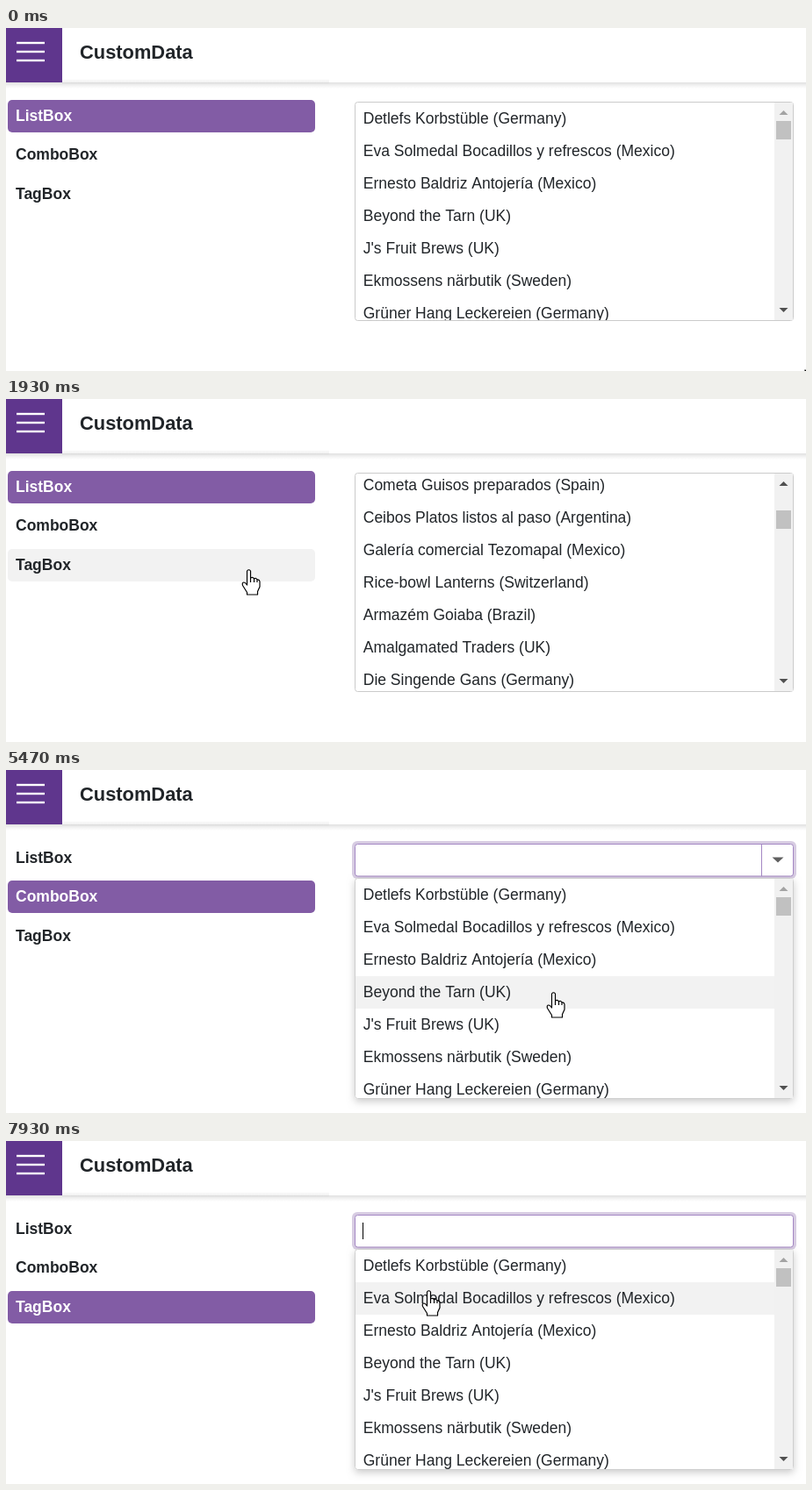
Write an HTML page with a canvas that moves like this. It is 911 by 391 pixels and loops after 8000 ms.

```html
<!DOCTYPE html>
<html lang="en">
<head>
<meta charset="utf-8">
<title>CustomData</title>
<style>
  html, body { margin: 0; width: 100%; height: 100%; overflow: hidden; background: #fff; }
  canvas { display: block; }
</style>
</head>
<body>
<canvas id="stage" width="911" height="391"></canvas>
<script>
const ctx = document.getElementById('stage').getContext('2d', { alpha: false });
const FONT = '"Liberation Sans", Arial, sans-serif';
const DURATION = 8000, TICKS = 120, ROW = 37;
const INK = '#212529', PURPLE = '#5f368d', ACTIVE = '#825ca5', HOVER = '#f2f2f2';

const companies = [
  'Detlefs Korbstüble (Germany)',
  'Eva Solmedal Bocadillos y refrescos (Mexico)',
  'Ernesto Baldriz Antojería (Mexico)',
  'Beyond the Tarn (UK)',
  "J's Fruit Brews (UK)",
  'Ekmossens närbutik (Sweden)',
  'Grüner Hang Leckereien (Germany)',
  'Marvoisant mère et fille (France)',
  'Vite doré (France)',
  'Copper-Nickel Grocers (Canada)',
  'Cometa Guisos preparados (Spain)',
  'Ceibos Platos listos al paso (Argentina)',
  'Galería comercial Tezomapal (Mexico)',
  'Rice-bowl Lanterns (Switzerland)',
  'Armazém Goiaba (Brazil)',
  'Amalgamated Traders (UK)',
  'Die Singende Gans (Germany)'
];
const menu = [
  { label: 'ListBox', y: 82 },
  { label: 'ComboBox', y: 126 },
  { label: 'TagBox', y: 171 }
];

// Keys are [tick, ...values]; there are 15 ticks per second.
const pointerKeys = [
  [0, 910, 390], [9, 640, 190], [24, 640, 190], [29, 277, 195], [33, 140, 160],
  [36, 115, 146], [46, 115, 146], [53, 482, 91], [54, 482, 91], [56, 505, 107],
  [71, 505, 107], [74, 640, 100], [77, 824, 160], [80, 700, 230], [84, 548, 278],
  [94, 82, 194], [104, 82, 194], [113, 482, 104], [117, 482, 104], [119, 482, 171]
];
const scrollKeys = [[0, 0], [12, 0], [15, 128], [18, 250], [20, 250], [24, 375]];

function valuesAt(keys, tick) {
  const next = keys.findIndex(key => key[0] > tick);
  if (next < 0) return keys[keys.length - 1].slice(1);
  const a = keys[next - 1], b = keys[next];
  const p = (tick - a[0]) / (b[0] - a[0]);
  return a.slice(1).map((v, i) => v + (b[i + 1] - v) * p);
}
const scrollAt = tick => Math.round(valuesAt(scrollKeys, tick)[0]);
const inside = (p, x, y, w, h) => p.x >= x && p.x < x + w && p.y >= y && p.y < y + h;

function rect(x, y, w, h, color) {
  ctx.fillStyle = color;
  ctx.fillRect(x, y, w, h);
}
function rounded(x, y, w, h, r, fill, stroke) {
  ctx.beginPath();
  ctx.roundRect(x, y, w, h, r);
  if (fill) { ctx.fillStyle = fill; ctx.fill(); }
  if (stroke) { ctx.strokeStyle = stroke; ctx.lineWidth = 1; ctx.stroke(); }
}
function text(str, x, y, color = INK, size = 17.5, weight = '') {
  ctx.font = `${weight} ${size}px ${FONT}`;
  ctx.fillStyle = color;
  ctx.fillText(str, x, y);
}
function triangle(x, y, halfWidth, height, color) {
  ctx.beginPath();
  ctx.moveTo(x - halfWidth, y - height / 2);
  ctx.lineTo(x + halfWidth, y - height / 2);
  ctx.lineTo(x, y + height / 2);
  ctx.fillStyle = color;
  ctx.fill();
}
function fade(x, y, w, h, alphas) {
  const g = ctx.createLinearGradient(0, y, 0, y + h);
  alphas.forEach((a, i) => g.addColorStop(i / (alphas.length - 1), `rgba(0,0,0,${a})`));
  rect(x, y, w, h, g);
}

function drawHeader() {
  fade(64, 58, 304, 6, [0, 0.05, 0]);
  fade(0, 62, 911, 7, [0.12, 0.05, 0]);
  rect(0, 0, 64, 62, PURPLE);
  for (const y of [16, 26, 36]) rect(12, y - 0.2, 32, 2.4, '#fff');
  text('CustomData', 84, 35, INK, 21.875, 'bold');
}

function drawMenu(selected, pointer) {
  menu.forEach(({ label, y }, i) => {
    const active = i === selected;
    if (active || inside(pointer, 2, y, 350, ROW)) {
      rounded(2, y, 350, ROW, 5, active ? ACTIVE : HOVER);
    }
    text(label, 11, y + 24, active ? '#fff' : INK, 17.5, 'bold');
  });
}

function drawList(top, height, scroll, pointer) {
  ctx.save();
  ctx.beginPath();
  ctx.rect(398, top, 498, height);
  ctx.clip();
  companies.forEach((name, i) => {
    const y = top + i * ROW - scroll;
    if (pointer && inside(pointer, 398, y, 477, ROW)) rect(398, y, 477, ROW, HOVER);
    text(name, 406.75, y + 24);
  });
  rect(875, top, 21, height, '#f1f1f1');
  rect(877, top + 21 + Math.round(scroll * 0.056), 17, 21, '#c1c1c1');
  triangle(885.5, top + 11.5, 5, -5, scroll ? '#505050' : '#a3a3a3');
  triangle(885.5, top + height - 11.5, 5, 5, '#505050');
  ctx.restore();
}

function drawInput(hasButton, focus) {
  const border = focus ? '#a488c4' : '#cbcbcb';
  if (focus) rounded(394, 81, 506, 43, 6, `rgba(95,54,141,${0.25 * focus})`);
  rounded(397.5, 84.5, 499, 36.5, 3, '#fff', border);
  if (hasButton) {
    rect(860, 85, 1, 36, border);
    triangle(879, 102.5, 6.5, 6, '#606060');
  }
}

function drawDropdown(pointer) {
  ctx.save();
  ctx.shadowColor = 'rgba(0,0,0,.2)';
  ctx.shadowBlur = 9;
  ctx.shadowOffsetY = 3;
  rounded(397, 123.5, 500, 251.5, 3, '#fff');
  ctx.restore();
  rounded(397.5, 123.5, 499, 251, 3, '#fff', '#cfcfcf');
  drawList(124, 250, 0, pointer);
}

const cursors = {
  arrow: 'M0 0V17L4 13.5L7 20L9.5 19L7 12.5H12Z',
  hand: 'M-2.5 1Q-.5-1.5 1.5 1V9Q4 7.5 5.5 9.8Q8 8.5 9 11Q11.5 10.5 12 13V19L9.5 24.5V28H-2.5V25.5' +
        'L-7.5 17.5Q-8.5 14-6 14Q-4.5 14-2.5 17ZM1.5 9V14M5.5 10V14M9 11V14',
  beam: 'M-4-9.5H-1.5L0-8.5L1.5-9.5H4M0-8.5V8.5M-4 9.5H-1.5L0 8.5L1.5 9.5H4'
};
function drawCursor(kind, { x, y }) {
  const path = new Path2D(cursors[kind]);
  ctx.save();
  ctx.translate(x, y);
  ctx.lineJoin = 'round';
  if (kind !== 'beam') {
    ctx.fillStyle = '#fff';
    ctx.fill(path);
  }
  ctx.strokeStyle = '#000';
  ctx.lineWidth = kind === 'beam' ? 1.8 : 1.2;
  ctx.stroke(path);
  ctx.restore();
}

function draw(tick) {
  const [px, py] = valuesAt(pointerKeys, tick);
  const pointer = { x: Math.round(px), y: Math.round(py) };
  const selected = tick < 40 ? 0 : tick < 99 ? 1 : 2;
  const open = (tick >= 63 && tick < 98) || tick >= 117;
  const focus = tick === 59 ? 0.5 : (tick >= 60 && tick < 98) || tick >= 114 ? 1 : 0;

  rect(0, 0, 911, 391, '#fff');
  drawHeader();
  drawMenu(selected, pointer);

  if (selected === 0) {
    const scroll = scrollAt(tick);
    const scrolling = tick > 0 && scroll !== scrollAt(tick - 1);
    rounded(397.5, 84.5, 499, 249, 3, '#fff', '#cbcbcb');
    drawList(85, 248, scroll, scrolling ? null : pointer);
  } else {
    drawInput(selected === 1, focus);
    if (open) drawDropdown(pointer);
    if (tick >= 119) rect(406, 93, 1, 19, '#000');
  }

  const overMenu = menu.some(item => inside(pointer, 2, item.y, 350, ROW));
  const overRows = selected === 0 ? inside(pointer, 398, 85, 477, 248)
                                  : open && inside(pointer, 398, 124, 477, 250);
  const overInput = selected > 0 && inside(pointer, 398, 85, selected === 1 ? 462 : 498, 37);
  drawCursor(overInput ? 'beam' : overMenu || overRows ? 'hand' : 'arrow', pointer);
}

const start = performance.now();
function frame() {
  const ms = (performance.now() - start) % DURATION;
  draw(Math.min(TICKS - 1, Math.floor((ms + 4) * TICKS / DURATION)));
  requestAnimationFrame(frame);
}
frame();
</script>
</body>
</html>
```
